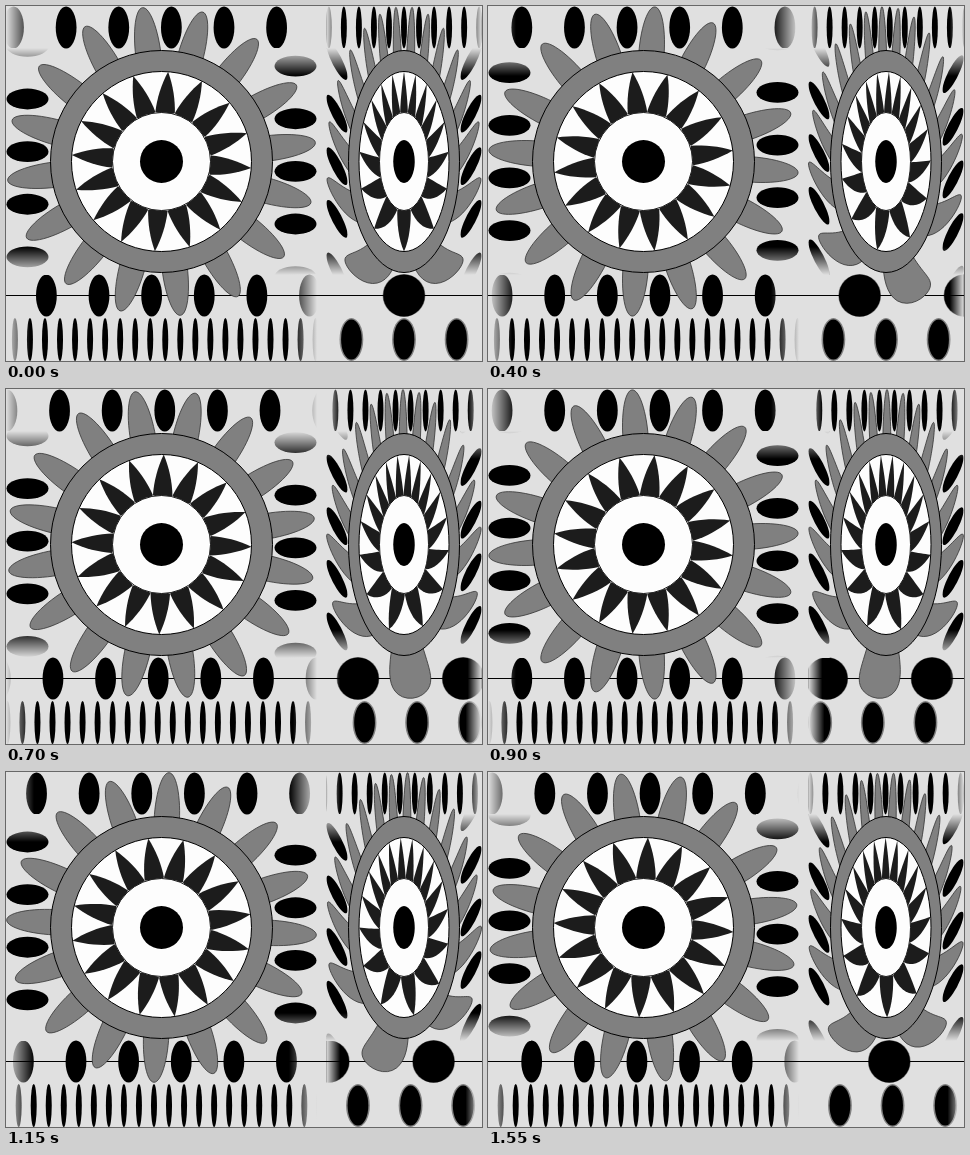
An HTML page with a canvas for the animation above (1600 ms loop, 476 px wide and 355 px high).

```html
<!DOCTYPE html>
<html lang="en">
<head>
<meta charset="utf-8">
<title>Gears and racks</title>
<style>
html, body { margin: 0; width: 476px; height: 355px; overflow: hidden; background: #e0e0e0; }
canvas { display: block; }
</style>
</head>
<body>
<canvas id="stage" width="476" height="355"></canvas>
<script>
const ctx = document.getElementById('stage').getContext('2d');
const TAU = Math.PI * 2;
const TEETH = 16;
const R = 134;                 // pitch radius
const PITCH = TAU * R / TEETH;
const STEP = TAU / TEETH;
const HALF = 155.5;
const CY = 155.5;
const LOOP = 1600, TICK = 50, TICKS = LOOP / TICK;
const BG = '#e0e0e0', BG_CLEAR = 'rgba(224,224,224,0)';
const GRAY = '#808080', DARK = '#1c1c1c', WHITE = '#fdfdfd';

// Each wheel shows the phase field angle + skew * x / R.
const wheels = [
  { cx: 155.5, sx: 1, skew: 0, turn: n => STEP * (0.5 + 2 * (n - 5) / TICKS) },
  { cx: 398, sx: 0.5, skew: 0.75, turn: n => STEP * n / TICKS }
];

// Solves phi + a * sin(phi) = phase by bisection.
function unskew(phase, a) {
  if (!a) return phase;
  const turns = Math.round(phase / TAU) * TAU;
  const target = phase - turns;
  let lo = -Math.PI, hi = Math.PI;
  for (let i = 0; i < 24; i++) {
    const mid = (lo + hi) / 2;
    if (mid + a * Math.sin(mid) < target) lo = mid; else hi = mid;
  }
  return (lo + hi) / 2 + turns;
}

function lineTo(w, r, phase) {
  const phi = unskew(phase, w.skew * r / R);
  ctx.lineTo(w.cx + w.sx * r * Math.sin(phi), CY - r * Math.cos(phi));
}

function disc(x, y, rx, ry, fill, stroke) {
  ctx.beginPath();
  ctx.ellipse(x, y, rx, ry, 0, 0, TAU);
  ctx.fillStyle = fill;
  ctx.fill();
  if (stroke) {
    ctx.strokeStyle = stroke;
    ctx.lineWidth = 1;
    ctx.stroke();
  }
}

function round(w, r, fill, stroke) {
  disc(w.cx, CY, r * w.sx, r, fill, stroke);
}

// Fades both ends of a band towards the background.
function fadeEnds(half, y, h, size) {
  for (const side of [-1, 1]) {
    const g = ctx.createLinearGradient(side * half, 0, side * (half - size), 0);
    g.addColorStop(0, BG);
    g.addColorStop(1, BG_CLEAR);
    ctx.fillStyle = g;
    ctx.fillRect(side > 0 ? half - size : -half - 1, y, size + 1, h);
  }
}

function clipBand(half, y, h) {
  ctx.beginPath();
  ctx.rect(-half, y, half * 2, h);
  ctx.clip();
}

function racks(w, turn) {
  for (let q = 0; q < 4; q++) {
    const cos = [1, 0, -1, 0][q], sin = [0, 1, 0, -1][q];
    const g = 1 + w.skew * cos;
    const lean = w.skew * sin;
    const half = q % 2 ? 113.5 : HALF;
    ctx.save();
    ctx.translate(w.cx, CY);
    ctx.scale(w.sx, 1);
    ctx.rotate(q * Math.PI / 2);
    clipBand(half, -HALF, 43);
    for (let j = -9; j <= 9; j++) {
      ctx.save();
      ctx.transform(1 / g, 0, -lean / g, -1, (R * turn + PITCH * j - lean * R) / g, -R);
      if (w.skew && q === 2) disc(0, 0, 10.7, 21.4, GRAY);
      disc(0, 0, 10.4, 21, '#000');
      ctx.restore();
    }
    fadeEnds(half, -HALF - 1, 45, 28);
    ctx.restore();
  }
}

function strip(cx, half, gap, rx, shift, fade, rim) {
  ctx.save();
  ctx.translate(cx, 333.5);
  clipBand(half, -22, 44);
  const n = Math.ceil(half / gap) + 1;
  const offset = shift - Math.floor(shift);
  for (let j = -n; j <= n; j++) {
    const x = (j + offset) * gap;
    if (rim) disc(x, 0, rx + 1.5, 21.5, GRAY);
    disc(x, 0, rx, rim ? 20 : 21.5, '#000');
  }
  fadeEnds(half, -22, 44, fade);
  ctx.restore();
}

function tooth(w, phase) {
  ctx.beginPath();
  for (let i = 0; i <= 28; i++) {
    const t = Math.PI * i / 28;
    const r = 108 + 47 * Math.sin(t);
    lineTo(w, r, phase - 12.7 * Math.cos(t) / r);
  }
  ctx.closePath();
  ctx.fillStyle = GRAY;
  ctx.fill();
  ctx.strokeStyle = '#333';
  ctx.lineWidth = 0.8;
  ctx.stroke();
}

function spike(w, phase) {
  ctx.beginPath();
  for (let i = -8; i <= 8; i++) {
    const f = Math.abs(i) / 8;
    lineTo(w, 90 - 40 * f, phase + Math.sign(i) * f * STEP / 2);
  }
  lineTo(w, 46, phase);
  ctx.closePath();
  ctx.fillStyle = DARK;
  ctx.fill();
}

function gear(w, turn) {
  for (let i = 0; i < TEETH; i++) tooth(w, turn + STEP * (i + 0.5));
  round(w, 111, GRAY, '#000');
  round(w, 90, WHITE, '#000');
  for (let i = 0; i < TEETH; i++) spike(w, turn + STEP * i);
  round(w, 49, WHITE, DARK);
  round(w, 21.5, '#000');
}

function draw(n) {
  ctx.fillStyle = BG;
  ctx.fillRect(0, 0, 476, 355);
  for (const w of wheels) racks(w, w.turn(n));
  strip(155.5, HALF, PITCH / 3.5, 3, 0.25 - n / 4, 24, false);
  strip(398, 77.5, PITCH, 10.4, -n / 8, 16, true);
  ctx.fillStyle = '#000';
  ctx.fillRect(0, 289, 476, 1);
  for (const w of wheels) gear(w, w.turn(n));
}

let last = -1;
function frame() {
  const n = Math.floor(performance.now() % LOOP / TICK);
  if (n !== last) draw(last = n);
  requestAnimationFrame(frame);
}
frame();
</script>
</body>
</html>
```
